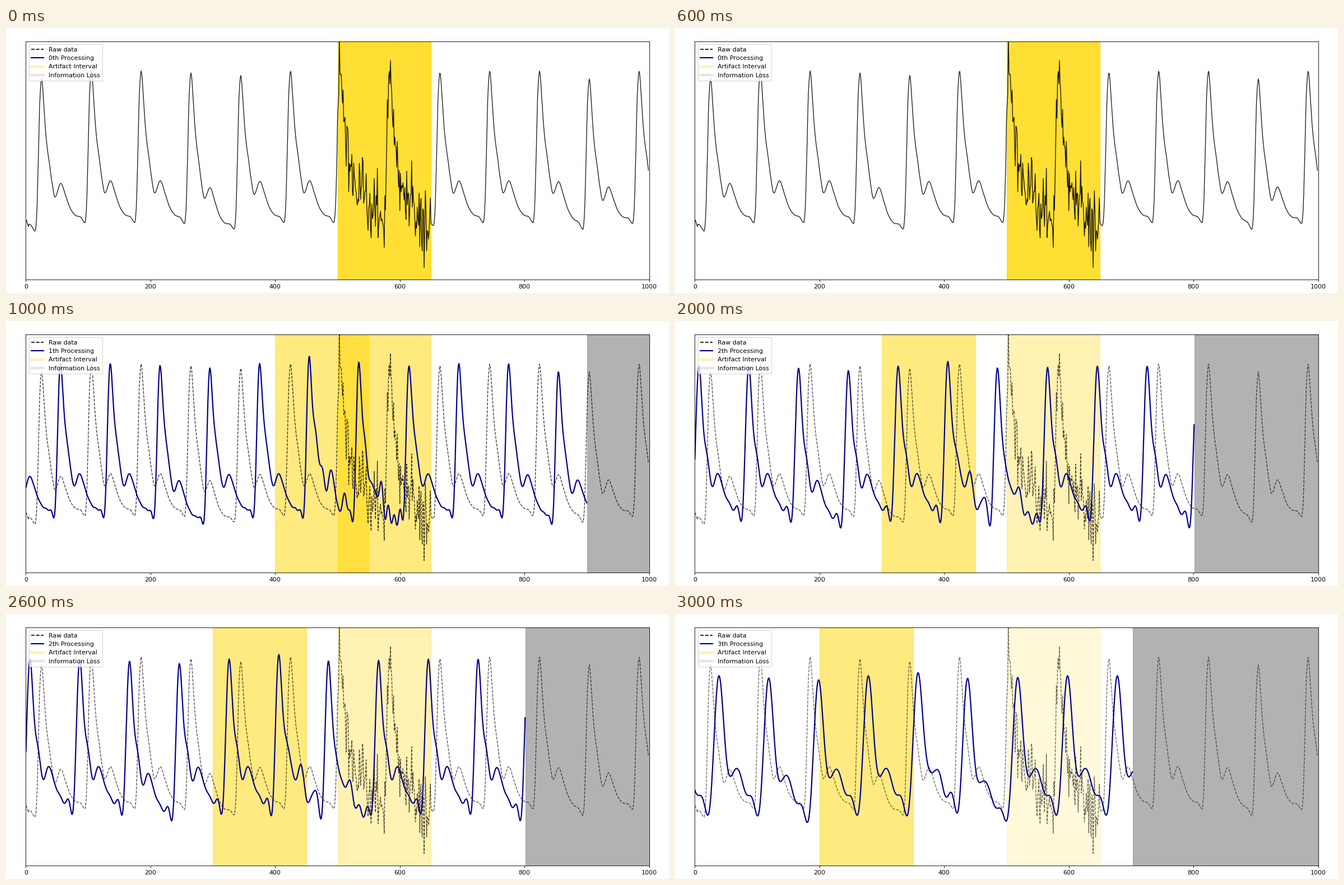
Write a matplotlib script that moves like this. It is 1183 px wide and 473 px high and loops after 4000 ms.

```python
import numpy as np
import matplotlib.pyplot as plt
from matplotlib.animation import FuncAnimation
from matplotlib.lines import Line2D

WIDTH, HEIGHT = 1183, 473
DPI = WIDTH / 15
SAMPLES, TAPS = 1000, 100
PERIOD, FIRST_PEAK, FOOT = 79.9, 25.2, -10.3
ARTIFACT_START, ARTIFACT_LENGTH = 500, 150
CUTOFFS = [.11, .078, .047]  # cycles per sample, one per pass
RAW_ALPHA = [.9, .8, .7, .6]
SPAN_ALPHA = [.8, .5, .3, .15]

# One heartbeat, foot to foot: samples from the peak, height down the stage
BEAT = [
    (FOOT, 347), (-8.1, 325), (-5.4, 225), (-2.7, 111), (0, 76), (3.6, 124),
    (6.3, 170), (9, 202), (12.6, 231), (16.2, 263), (21.6, 294), (30.6, 272),
    (38.7, 296), (45, 317), (50.4, 328), (55.8, 334), (62, 336), (PERIOD + FOOT, 347),
]

plt.rcParams["font.family"] = "DejaVu Sans"


def smooth(x, knots):
    """Monotone cubic curve through the knots."""
    kx, ky = np.array(knots).T
    h = np.diff(kx)
    d = np.diff(ky) / h
    m = np.zeros_like(ky)
    inner = np.flatnonzero(d[:-1] * d[1:] > 0)
    m[inner + 1] = 2 * d[inner] * d[inner + 1] / (d[inner] + d[inner + 1])
    i = np.clip(np.searchsorted(kx, x) - 1, 0, len(h) - 1)
    t = (x - kx[i]) / h[i]
    return (ky[i] + (ky[i + 1] - ky[i]) * t * t * (3 - 2 * t)
            + h[i] * t * (1 - t) * (m[i] * (1 - t) - m[i + 1] * t))


def record():
    """Pulse wave with a breathing drift and a noisy artifact."""
    t = np.arange(SAMPLES)
    phase = (t - FIRST_PEAK - FOOT) % PERIOD + FOOT
    breath = (t - 13 + 150) % 300 - 150
    noise = np.where(t < 5, 4, 0)
    noise[ARTIFACT_START:ARTIFACT_START + ARTIFACT_LENGTH] = 27
    return (smooth(phase, BEAT) + 15 * np.exp(-(breath / 40) ** 2)
            + noise * np.random.default_rng(5).normal(size=SAMPLES))


def low_pass(signal, cutoff):
    """Windowed-sinc filter; each pass costs TAPS - 1 samples."""
    n = np.arange(TAPS) - (TAPS - 1) / 2
    kernel = np.sinc(2 * cutoff * n) * np.hamming(TAPS)
    return np.convolve(signal, kernel / kernel.sum(), mode="valid")


signals = [record()]
for cutoff in CUTOFFS:
    signals.append(low_pass(signals[-1], cutoff))

# The tiny margin keeps the pixel size from rounding down.
fig = plt.figure(figsize=((WIDTH + 1e-6) / DPI, (HEIGHT + 1e-6) / DPI), dpi=DPI,
                 facecolor="white")
ax = fig.add_axes([.03, .05, .94, .9])


def shade(start, end, color, alpha):
    ax.axvspan(start, end, color=color, alpha=alpha)


def draw(step):
    ax.clear()
    ax.set(xlim=(0, SAMPLES), ylim=(.95 * HEIGHT - .5, .05 * HEIGHT - .5),
           xticks=range(0, SAMPLES + 1, 200), yticks=[])

    shade(ARTIFACT_START, ARTIFACT_START + ARTIFACT_LENGTH, "gold", SPAN_ALPHA[step])
    ax.plot(signals[0], "--" if step else "-", color="black", lw=1.2, alpha=RAW_ALPHA[step])
    if step:
        start = ARTIFACT_START - TAPS * step
        shade(start, start + ARTIFACT_LENGTH, "gold", .5)
        shade(len(signals[step]), SAMPLES, "gray", .6)
        ax.plot(signals[step], color="darkblue", lw=2)

    ax.legend(loc="upper left", handles=[
        Line2D([], [], color="black", ls="--", lw=1.5, label="Raw data"),
        Line2D([], [], color="darkblue", lw=2, label=f"{step}th Processing"),
        Line2D([], [], color="gold", lw=4, alpha=.3, label="Artifact Interval"),
        Line2D([], [], color="gray", lw=4, alpha=.2, label="Information Loss"),
    ])


anim = FuncAnimation(fig, draw, frames=4, interval=1000, repeat=True, repeat_delay=0)
plt.show()
```
